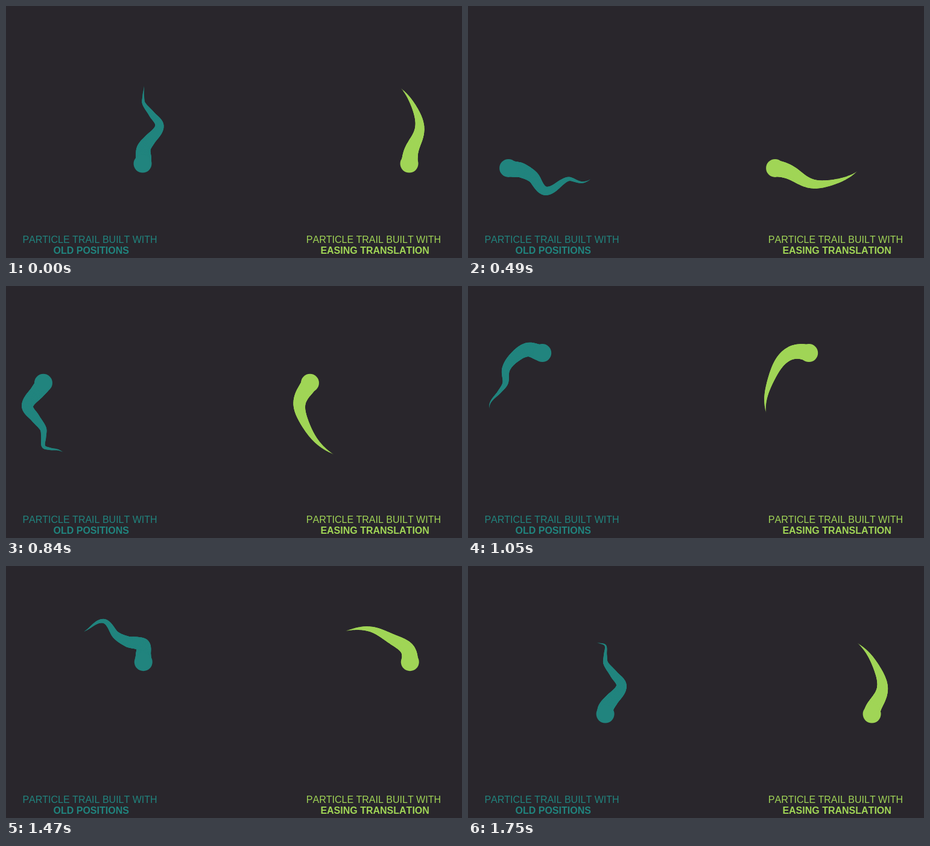
Animation of 756 by 418 pixels, one loop 1.82 s. Source, as an HTML page with a canvas:

```html
<!DOCTYPE html>
<html lang="en">
<head>
<meta charset="utf-8">
<title>Particle trails</title>
<style>
  html, body { margin: 0; width: 100%; height: 100%; overflow: hidden; background: #29262c; }
  canvas { display: block; }
</style>
</head>
<body>
<canvas id="stage" width="756" height="418"></canvas>
<script>
const ctx = document.getElementById('stage').getContext('2d');
const TEAL = '#21847e', GREEN = '#a0d556', BACKGROUND = '#29262c';
const LOOP = 1820, STEP = 70;
const CENTER = { x: 145, y: 199 }, RIGHT_OFFSET = 442;
const HEAD_RADIUS = 15, TRAIL_RADIUS = 13.7;
const OLD_SPAN = 78;                        // degrees covered by the stored positions
const TICK = 3.3, EASE = 0.7, LINKS = 58;   // easing chain

// Orbit as [angle, radius]; it repeats after half a turn.
const ORBIT = [
  [0, 109.5], [14, 96], [25, 91.5], [37, 102.5], [51, 105.5], [64, 104], [75, 91], [83, 93.5],
  [99, 109], [113.5, 92.5], [128, 93], [136, 102], [141, 106.5], [148, 97.5], [156, 91.5], [169, 99]
];

// Phase of the head over time: [step, degrees].
const PACE = [[0, 40.5], [3, 85.3], [7, 137.5], [12, 201.8], [15, 253.7], [21, 335.8], [25, 392.4]];

const radians = degrees => degrees * Math.PI / 180;

function orbitKnot(i) {
  const n = ORBIT.length, turns = Math.floor(i / n);
  const [angle, radius] = ORBIT[i - turns * n];
  return [angle + 180 * turns, radius];
}

function orbitRadius(angle) {
  const a = ((angle % 180) + 180) % 180;
  let i = ORBIT.length - 1;
  while (ORBIT[i][0] > a) i--;
  const [p, q, r, s] = [i - 1, i, i + 1, i + 2].map(orbitKnot);
  const span = r[0] - q[0], u = (a - q[0]) / span;
  const m0 = (r[1] - p[1]) / (r[0] - p[0]) * span;
  const m1 = (s[1] - q[1]) / (s[0] - q[0]) * span;
  const d = r[1] - q[1];
  return q[1] + u * (m0 + u * (3 * d - 2 * m0 - m1 + u * (m0 + m1 - 2 * d)));
}

// The orbit is a little faster on its lower left side.
function orbit(phase) {
  const angle = phase + 3 * Math.sin(radians(phase - 126));
  const radius = orbitRadius(angle), a = radians(angle);
  return { x: CENTER.x + radius * Math.cos(a), y: CENTER.y + radius * Math.sin(a) };
}

function headPhase(step) {
  let i = 0;
  while (i < PACE.length - 2 && PACE[i + 1][0] <= step) i++;
  const [s0, p0] = PACE[i], [s1, p1] = PACE[i + 1];
  return p0 + (p1 - p0) * (step - s0) / (s1 - s0);
}

function oldPositions(phase) {
  const count = 90;
  return Array.from({ length: count + 1 }, (_, i) => orbit(phase - OLD_SPAN * i / count));
}

// Every link eases toward the one ahead of it.
function easedPositions(phase) {
  const ticks = 140;
  const chain = Array.from({ length: LINKS + 1 }, () => orbit(phase - ticks * TICK));
  for (let t = ticks; t >= 0; t--) {
    chain[0] = orbit(phase - t * TICK);
    for (let i = 1; i <= LINKS; i++) {
      chain[i].x += (chain[i - 1].x - chain[i].x) * EASE;
      chain[i].y += (chain[i - 1].y - chain[i].y) * EASE;
    }
  }
  return chain;
}

function drawParticle(points, color, offset) {
  ctx.strokeStyle = ctx.fillStyle = color;
  ctx.lineCap = 'round';
  const last = points.length - 1;
  for (let i = 0; i < last; i++) {
    ctx.lineWidth = 2 * TRAIL_RADIUS * (1 - (i + 0.5) / last);
    ctx.beginPath();
    ctx.moveTo(points[i].x + offset, points[i].y);
    ctx.lineTo(points[i + 1].x + offset, points[i + 1].y);
    ctx.stroke();
  }
  ctx.beginPath();
  ctx.arc(points[0].x + offset, points[0].y, HEAD_RADIUS, 0, 2 * Math.PI);
  ctx.fill();
}

function drawCaption(method, color, x) {
  const family = '"Liberation Sans", Arial, sans-serif';
  ctx.fillStyle = color;
  ctx.textAlign = 'center';
  ctx.fontKerning = 'none';
  ctx.font = '16px ' + family;
  ctx.fillText('PARTICLE TRAIL BUILT WITH', x - 2.2, 393);
  ctx.font = 'bold 16px ' + family;
  ctx.fillText(method, x, 411);
}

function draw(now) {
  const phase = headPhase(Math.floor((now % LOOP) / STEP));
  ctx.fillStyle = BACKGROUND;
  ctx.fillRect(0, 0, 756, 418);
  drawParticle(oldPositions(phase), TEAL, 0);
  drawParticle(easedPositions(phase), GREEN, RIGHT_OFFSET);
  drawCaption('OLD POSITIONS', TEAL, 141.2);
  drawCaption('EASING TRANSLATION', GREEN, 611.6);
}

const start = performance.now();
function loop() {
  draw(performance.now() - start);
  requestAnimationFrame(loop);
}
loop();
</script>
</body>
</html>
```
